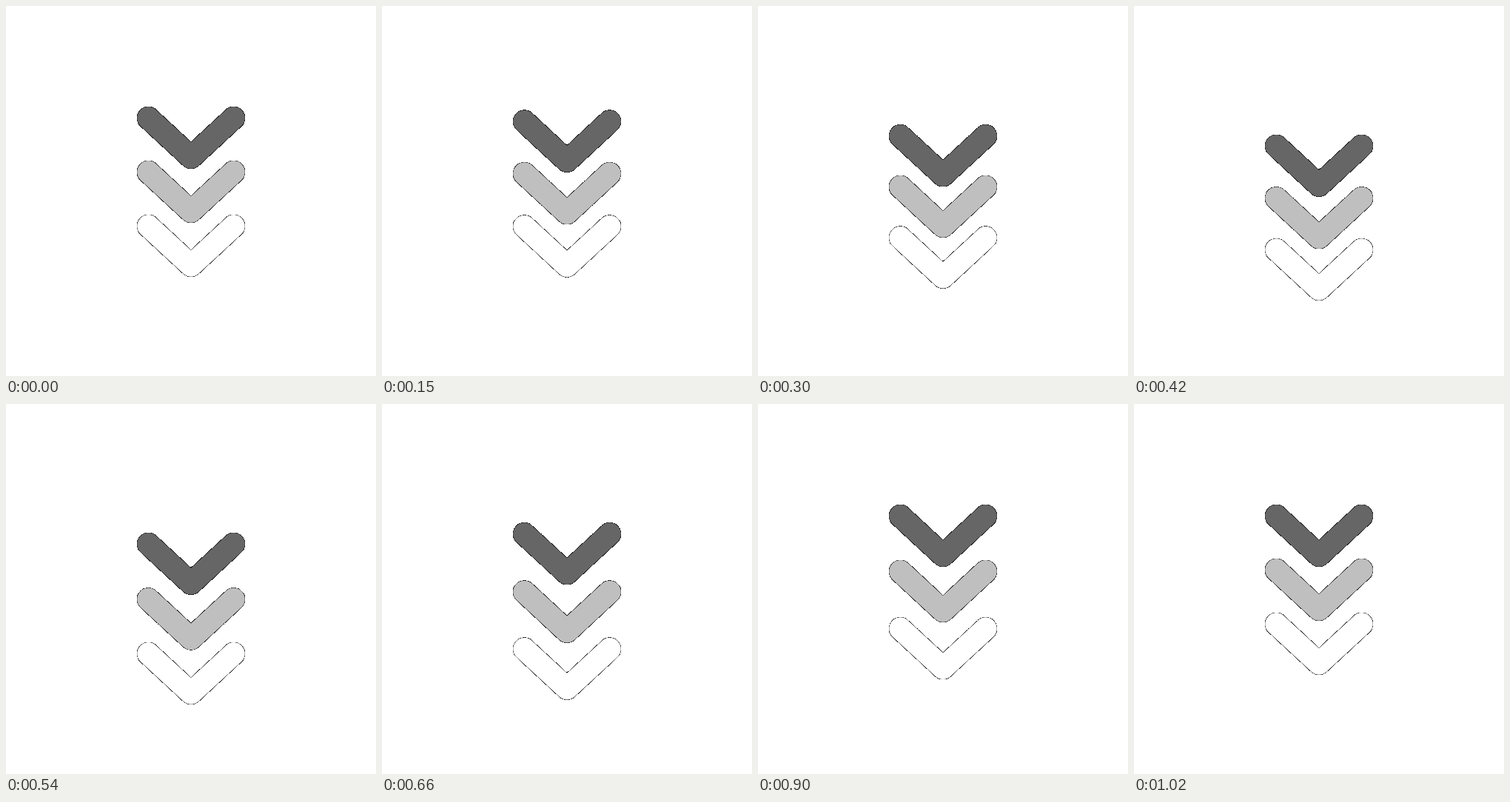
These frames come from a looping animation (500 px wide and 500 px high, 1050 ms). An HTML page with a canvas:

```html
<!DOCTYPE html>
<html lang="en">
<head>
<meta charset="utf-8">
<title>Scroll down chevrons</title>
<style>
  html, body { margin: 0; width: 100%; height: 100%; overflow: hidden; background: #fff; }
  canvas { display: block; width: 500px; height: 500px; }
</style>
</head>
<body>
<canvas id="stage" width="500" height="500"></canvas>
<script>
const LOOP = 1050, STEP = 30, TRAVEL = 40;
const BOX = { x: 170, y: 130, w: 160, h: 285 };

// y: resting height of the arm ends; the chevron sinks from start to peak, rises until end
const chevrons = [
  { y: 151.3, alpha: 0.4,  start: 60,  peak: 480, end: 900 },
  { y: 224.3, alpha: 0.75, start: 90,  peak: 510, end: 960 },
  { y: 297.3, alpha: 1,    start: 120, peak: 540, end: 1020 }
];

const ctx = document.getElementById('stage').getContext('2d', { willReadFrequently: true });

function ease(t) {
  const p = Math.min(1, Math.max(0, t));
  return p * p * (3 - 2 * p);
}

function offset({ start, peak, end }, t) {
  return TRAVEL * (t < peak
    ? ease((t - start) / (peak - start))
    : 1 - ease((t - peak) / (end - peak)));
}

function drawChevron(y, alpha) {
  ctx.strokeStyle = `rgba(255, 255, 255, ${alpha})`;
  ctx.beginPath();
  ctx.moveTo(192.4, y);
  ctx.lineTo(250, y + 53.3);
  ctx.lineTo(307.6, y);
  ctx.stroke();
}

// Blend every touched pixel with black, so soft edges become the thin dark outline
function matte() {
  const img = ctx.getImageData(BOX.x, BOX.y, BOX.w, BOX.h);
  const d = img.data;
  for (let i = 0; i < d.length; i += 4) {
    const grey = d[i + 3] || 255;
    d[i] = d[i + 1] = d[i + 2] = grey;
    d[i + 3] = 255;
  }
  ctx.putImageData(img, BOX.x, BOX.y);
}

function render(t) {
  ctx.clearRect(0, 0, 500, 500);
  ctx.lineWidth = 30.4;
  ctx.lineCap = ctx.lineJoin = 'round';
  for (const c of chevrons) drawChevron(c.y + offset(c, t), c.alpha);
  matte();
}

const origin = performance.now();
let shown = -1;

function tick() {
  const t = (performance.now() - origin) % LOOP;
  const step = Math.floor(t / STEP) * STEP;
  if (step !== shown) render(shown = step);
  requestAnimationFrame(tick);
}

tick();
</script>
</body>
</html>
```
